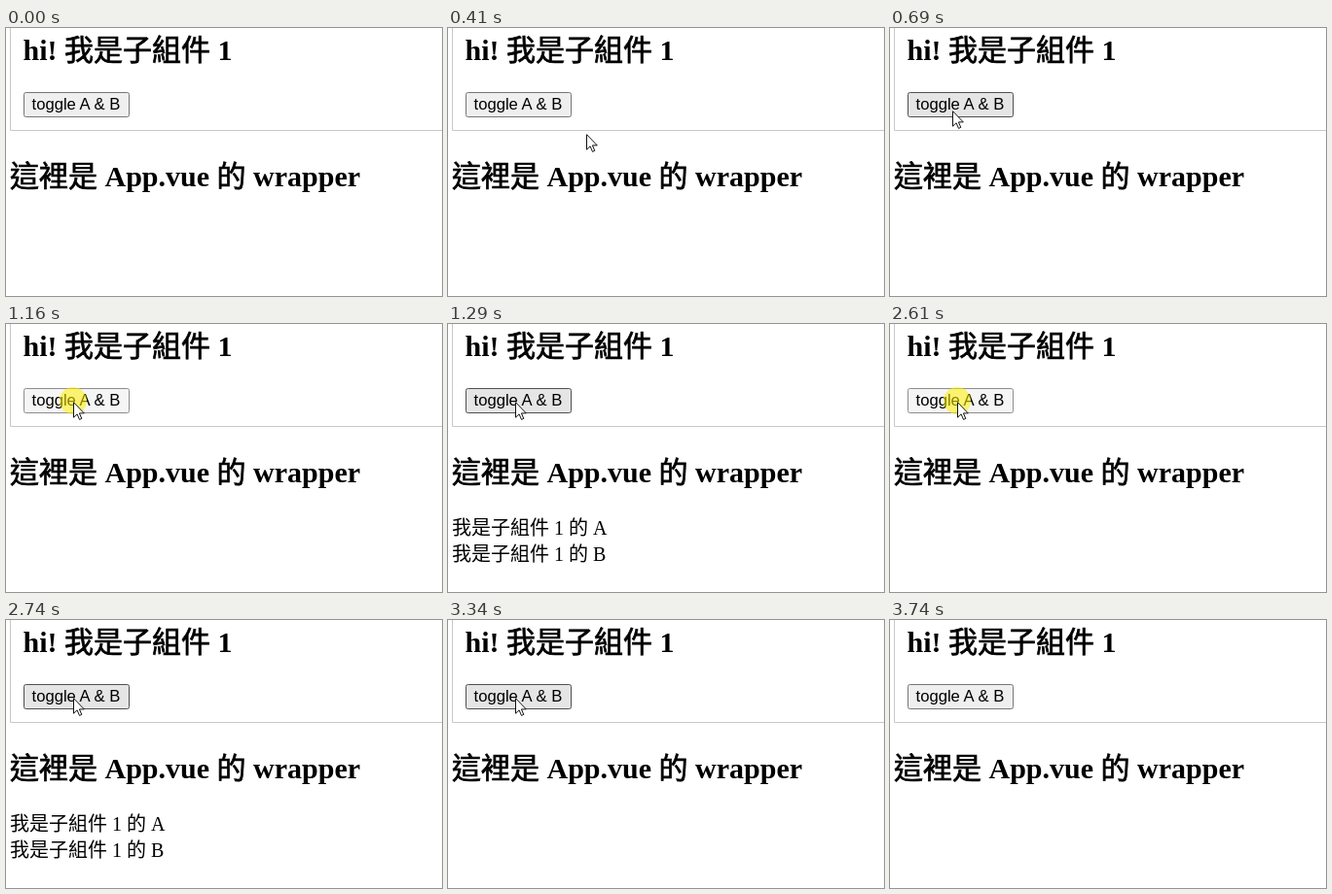
An HTML page that plays this animation: 448x276 px, repeating every 4200 ms.

```html
<!DOCTYPE html>
<html lang="zh-TW">
<head>
<meta charset="utf-8">
<title>toggle A &amp; B</title>
<style>
  html, body { margin: 0; width: 100%; height: 100%; overflow: hidden; background: #fff; }
  svg { display: block; width: 448px; height: 276px; }
  text { white-space: pre; fill: #000; }
  .head { font: bold 30px "Liberation Serif", "Noto Sans CJK TC", serif; }
  .body { font: 20px "Liberation Serif", "Noto Sans CJK TC", "Noto Sans CJK", serif; }
  .label { font: 16.667px "Liberation Sans", sans-serif; }
  .han { font-family: "Noto Sans CJK TC", "Noto Sans CJK", sans-serif; font-weight: 400; }
  .head .han { stroke: #000; stroke-width: .7px; }
</style>
</head>
<body>
<svg viewBox="0 0 448 276" lang="zh-TW">
  <path d="M4.5 -1V105.5H449" fill="none" stroke="#c8c8c8"/>
  <text class="head" x="17.5" y="33">hi! <tspan class="han">我是子組件</tspan> 1</text>
  <rect id="button" x="18.5" y="66.5" width="108" height="25" rx="2"/>
  <text class="label" x="26.5" y="84">toggle A &amp; B</text>
  <text class="head" x="4" y="163"><tspan class="han">這裡是</tspan> App.vue <tspan class="han">的</tspan> wrapper</text>
  <g id="slots" class="body">
    <text x="4" y="217"><tspan class="han">我是子組件</tspan> 1 <tspan class="han">的</tspan> A</text>
    <text x="4" y="244"><tspan class="han">我是子組件</tspan> 1 <tspan class="han">的</tspan> B</text>
  </g>
  <circle id="halo" cx="69" cy="79" r="14" fill="#fe0" opacity=".55"/>
  <path id="cursor" d="M.5 .7V16.2L4.1 12.8L6.5 18.4L8.8 17.4L6.4 11.9H11.3Z" fill="#fff" stroke="#111"/>
</svg>
<script>
const LOOP = 4200;
const START = [266, 148], ARRIVE = [64, 85], REST = [69, 80], EXIT = [399, 254];
const ENTER_TIMES = [200, 270, 340, 410, 480, 550, 620, 690];
const NUDGE_TIMES = [760, 830, 960];
const LEAVE_TIMES = [3470, 3540, 3610, 3670];
const CLICKS = [1160, 2020, 2610, 3210];
const SLOTS_SHOWN = [[1290, 2150], [2680, 3340]];
const STYLES = {
  idle: ["#efefef", "#767676"],
  hover: ["#e5e5e5", "#4f4f4f"],
  active: ["#f5f5f5", "#8d8d8d"]
};

const el = id => document.getElementById(id);
const [button, slots, halo, cursor] = ["button", "slots", "halo", "cursor"].map(el);
const show = (node, on) => node.setAttribute("visibility", on ? "visible" : "hidden");
const within = (t, [a, b]) => t >= a && t < b;
const mix = (a, b, p) => a.map((v, i) => Math.round(v + (b[i] - v) * p));
const passed = (t, times) => times.filter(s => t >= s).length;
const easeOut = p => 1 - (1 - p) ** 1.7;

// The pointer jumps between sampled positions, as in a screen recording.
function pointer(t) {
  if (t < 200 || t >= 3740) return null;
  if (t < 760) return mix(START, ARRIVE, easeOut((passed(t, ENTER_TIMES) - 1) / 7));
  if (t < 3470) return mix(ARRIVE, REST, passed(t, NUDGE_TIMES) / 3);
  return mix(REST, EXIT, (passed(t, LEAVE_TIMES) / 4) ** 1.2);
}

function draw(t) {
  const pos = pointer(t);
  const pressed = CLICKS.some(c => within(t, [c, c + 130]));
  const hover = pos && within(pos[0], [18, 127]) && within(pos[1], [66, 92]);
  const [fill, stroke] = STYLES[pressed ? "active" : hover ? "hover" : "idle"];
  button.setAttribute("fill", fill);
  button.setAttribute("stroke", stroke);
  show(slots, SLOTS_SHOWN.some(span => within(t, span)));
  show(halo, pressed);
  show(cursor, pos);
  if (pos) cursor.setAttribute("transform", `translate(${pos})`);
}

const begin = performance.now();
function tick() {
  draw((performance.now() - begin) % LOOP);
  requestAnimationFrame(tick);
}
draw(0);
requestAnimationFrame(tick);
</script>
</body>
</html>
```
